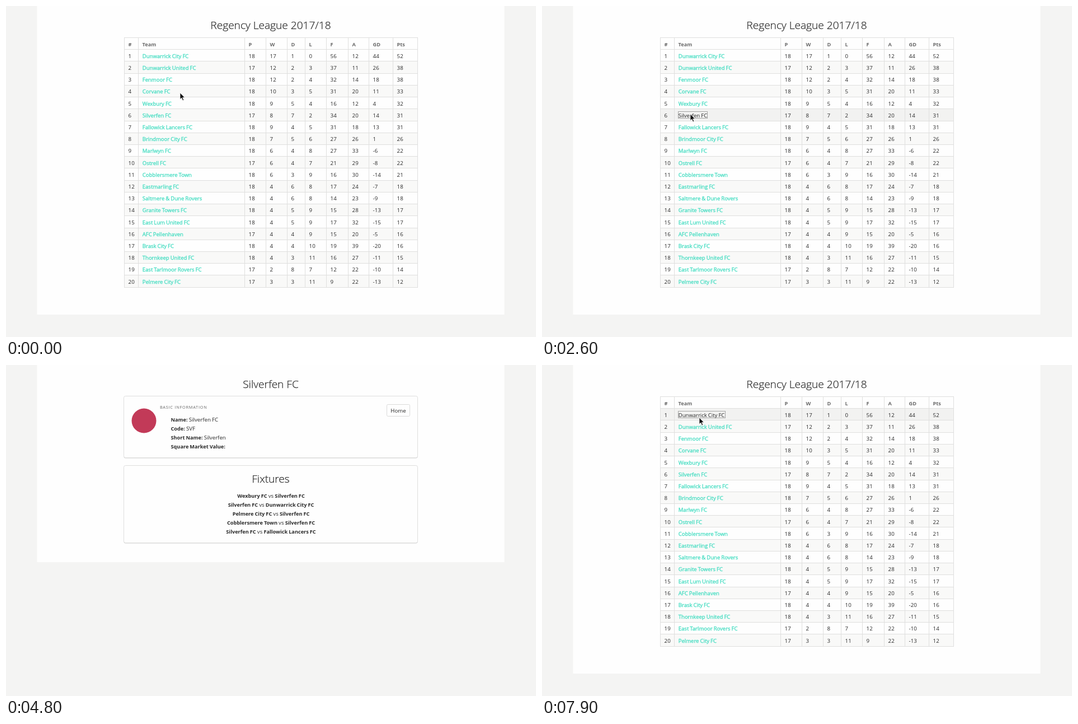
An HTML page that plays this animation: 947 by 591 pixels, repeating every 8 s.

```html
<!DOCTYPE html>
<html lang="en">
<head>
<meta charset="utf-8">
<title>League table</title>
<style>
  html, body { margin: 0; width: 100%; height: 100%; overflow: hidden; background: #f4f4f3; }
  svg { display: block; width: 947px; height: 591px; }
  text { font: 400 9.7px "Open Sans", "Noto Sans", sans-serif; fill: #2a2a2a; white-space: pre; word-spacing: -.4px; }
  .title { font-size: 19.1px; font-weight: 300; text-anchor: middle; word-spacing: 0; stroke: #2a2a2a; stroke-width: .25px; }
  .head { font-size: 9.2px; font-weight: 700; fill: #6a6a6a; }
  .link { font-size: 9.5px; fill: #41dcc0; stroke: #41dcc0; stroke-width: .3px; }
  .link.over { fill: #262626; stroke: none; }
  .bold { font-size: 9.2px; font-weight: 700; }
  .small { font-size: 7.3px; letter-spacing: .78px; word-spacing: 0; fill: #666; }
  .middle { text-anchor: middle; }
</style>
</head>
<body>
<svg id="stage" viewBox="0 0 947 591"></svg>
<script>
const LOOP = 8000, STEP = 100;
const TEAMS = `Dunwarrick City FC|17 1 0 56 12
Dunwarrick United FC|12 2 3 37 11
Fenmoor FC|12 2 4 32 14
Corvane FC|10 3 5 31 20
Wexbury FC|9 5 4 16 12
Silverfen FC|8 7 2 34 20
Fallowick Lancers FC|9 4 5 31 18
Brindmoor City FC|7 5 6 27 26
Marlwyn FC|6 4 8 27 33
Ostrell FC|6 4 7 21 29
Cobblersmere Town|6 3 9 16 30
Eastmarling FC|4 6 8 17 24
Saltmere & Dune Rovers|4 6 8 14 23
Granite Towers FC|4 5 9 15 28
East Lum United FC|4 5 9 17 32
AFC Pellenhaven|4 4 9 15 20
Brask City FC|4 4 10 19 39
Thornkeep United FC|4 3 11 16 27
East Tarlmoor Rovers FC|2 8 7 12 22
Pelmere City FC|3 3 11 9 22`.split('\n').map(line => {
  const [name, stats] = line.split('|');
  const [w, d, l, f, a] = stats.split(' ').map(Number);
  return { name, cells: [w + d + l, w, d, l, f, a, f - a, 3 * w + d] };
});
const COLUMNS = [211, 236, 426, 464, 502, 534, 572, 611, 648, 691, 735];
const HEADS = ['#', 'Team', 'P', 'W', 'D', 'L', 'F', 'A', 'GD', 'Pts'];
const TOP = 56, ROW = 21.22;

// [start ms, end ms, ...[ms, x, y]]: stretches during which the pointer is on stage
const PATHS = [
  [0, 3700, [0, 311, 155], [100, 311, 155], [500, 290, 282], [700, 284, 282],
    [800, 281, 258], [900, 279, 231], [1200, 265, 193]],
  [3700, 3800, [3700, 86, 79]],
  [5100, 5300, [5100, 0, -3]],
  [5800, 8000, [5800, 106, 28], [6100, 222, 68], [6500, 275, 89], [6800, 281, 94]]
];
const HOME_CLUB = TEAMS[5].name;

function add(parent, tag, attrs = {}, content = '') {
  const node = document.createElementNS('http://www.w3.org/2000/svg', tag);
  for (const key in attrs) node.setAttribute(key, attrs[key]);
  node.textContent = content;
  return parent.appendChild(node);
}
const box = (parent, x, y, width, height, fill, more) =>
  add(parent, 'rect', { x, y, width, height, fill, ...more });
// y is the middle of the capitals
const label = (parent, x, y, content, cls = '') =>
  add(parent, 'text', { x, y: y + (cls === 'title' ? 6.8 : cls === 'small' ? 2.6 : 3.5), class: cls }, content);
const lineY = i => Math.round(TOP + ROW * i);

function buildTable(parent) {
  box(parent, 55.5, 0, 835, 551, '#fefefe');
  label(parent, 473, 33.7, 'Regency League 2017/18', 'title');
  const rows = TEAMS.map((team, i) => {
    const top = lineY(i + 1), middle = 68 + 21.2 * (i + 1);
    const base = i % 2 ? '#f9f9f8' : '#fefefe';
    const band = box(parent, 211, top, 525, lineY(i + 2) - top, base);
    label(parent, COLUMNS[0] + 7.6, middle, i + 1);
    const link = label(parent, COLUMNS[1] + 7.8, middle, team.name, 'link');
    team.cells.forEach((value, c) => label(parent, COLUMNS[c + 2] + 7.6, middle, value));
    const length = link.getComputedTextLength();
    const outline = box(parent, 243.5, Math.round(middle - 6) - .5, Math.round(length + 1), 12, 'none',
      { stroke: '#555', 'stroke-dasharray': '1 1' });
    return { top, base, band, link, outline, right: 244 + length };
  });
  HEADS.forEach((head, c) => label(parent, COLUMNS[c] + 7.6, 68, head, 'head'));
  for (let i = 0; i <= TEAMS.length + 1; i++) box(parent, 211, lineY(i), 525, 1, '#dfdfde');
  COLUMNS.forEach(x => box(parent, x, TOP, 1, lineY(21) - TOP + 1, '#dfdfde'));
  return rows;
}

function card(parent, y, height) {
  box(parent, 210.5, y + 1.5, 525, height, '#d2d2d1', { rx: 3 });
  box(parent, 210.5, y + .5, 525, height, '#fefefe', { rx: 3, stroke: '#dededd' });
}

function mixedLine(parent, x, y, parts, cls) {
  const node = label(parent, x, y, '', cls);
  parts.forEach(([content, weight]) => add(node, 'tspan', { class: weight }, content));
}

function buildDetail(parent) {
  box(parent, 55.5, 0, 835, 352, '#fefefe');
  label(parent, 473, 33.7, HOME_CLUB, 'title');
  card(parent, 55, 110);
  card(parent, 179, 138);
  const alt = add(parent, 'g');
  label(alt, 224.5, 77.5, 'Team');
  label(alt, 224.5, 91.3, 'Logo');
  const badge = add(parent, 'circle', { cx: 246.5, cy: 99.5, r: 22, fill: '#c23a58' });
  label(parent, 275, 75.5, 'BASIC INFORMATION', 'small');
  [['Name:', HOME_CLUB], ['Code:', 'SVF'], ['Short Name:', 'Silverfen'], ['Square Market Value:', '']]
    .forEach(([key, value], i) =>
      mixedLine(parent, 294.5, 97.3 + 16.1 * i, [[key, 'bold'], [' ' + value, '']]));
  box(parent, 680.5, 70.5, 41, 21, '#fefefe', { rx: 2, stroke: '#dadad9' });
  label(parent, 701, 81.3, 'Home', 'middle');
  label(parent, 473, 203.5, 'Fixtures', 'title');
  [[4, 5], [5, 0], [19, 5], [10, 5], [5, 6]].forEach(([home, away], i) =>
    mixedLine(parent, 473.5, 233.4 + 16.1 * i,
      [[TEAMS[home].name, 'bold'], [' vs ', ''], [TEAMS[away].name, 'bold']], 'middle'));
  return { alt, badge };
}

function pointerAt(t) {
  const path = PATHS.find(([from, to]) => t >= from && t < to);
  if (!path) return null;
  const points = path.slice(2);
  const next = points.findIndex(p => p[0] > t);
  if (next < 0) return points[points.length - 1].slice(1);
  const [t0, x0, y0] = points[next - 1], [t1, x1, y1] = points[next];
  const k = (t - t0) / (t1 - t0);
  return [x0 + (x1 - x0) * k, y0 + (y1 - y0) * k];
}

const stage = document.getElementById('stage');
box(stage, 0, 0, 947, 591, '#f4f4f3');
const tablePage = add(stage, 'g'), detailPage = add(stage, 'g');
const rows = buildTable(tablePage);
const detail = buildDetail(detailPage);
const pointer = add(stage, 'path', {
  d: 'M0 0V11.6L2.7 9.1L4.8 13.7L6.7 12.9L4.7 8.4H8.3Z',
  fill: '#111', stroke: '#fff', 'stroke-width': .7
});
const show = (node, visible) => node.setAttribute('visibility', visible ? 'inherit' : 'hidden');

function draw(time) {
  const t = Math.floor(time / STEP) * STEP;
  const onDetail = t >= 3700 && t < 5300;
  show(tablePage, !onDetail);
  show(detailPage, onDetail);
  show(detail.alt, t < 4600);
  show(detail.badge, t >= 4600);

  // Highlighting trails the pointer by one step
  const held = t >= 5300 && t <= 5800;
  const behind = held ? [265, 193] : pointerAt(t - STEP);
  const focused = t >= 7300 ? 0 : t >= 2000 ? 5 : -1;
  rows.forEach((row, i) => {
    const over = behind && behind[0] > 211 && behind[1] >= row.top && behind[1] < row.top + ROW;
    row.band.setAttribute('fill', over ? '#f2f2f1' : row.base);
    row.link.classList.toggle('over', !!over && behind[0] >= 244 && behind[0] <= row.right);
    show(row.outline, i === focused);
  });

  const at = pointerAt(t);
  show(pointer, at);
  if (at) pointer.setAttribute('transform', `translate(${at[0]} ${at[1]})`);
}

const start = performance.now();
function tick() {
  draw((performance.now() - start) % LOOP);
  requestAnimationFrame(tick);
}
tick();
</script>
</body>
</html>
```
